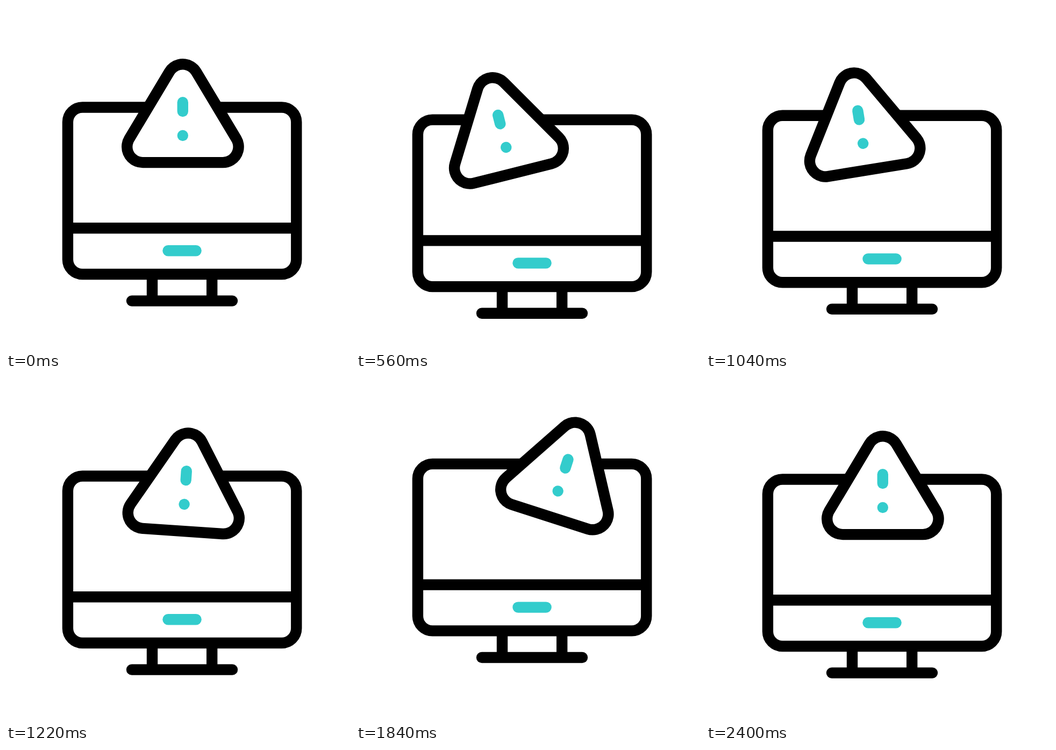
Write an HTML page that moves like this. It is 640 px wide and 640 px high and loops after 2.42 s.

```html
<!DOCTYPE html>
<html lang="en">
<head>
<meta charset="utf-8">
<title>Monitor alert</title>
<style>
  html, body { margin: 0; width: 100%; height: 100%; overflow: hidden; background: #fff; }
  svg { display: block; width: 100%; height: 100%; }
  .ink { fill: none; stroke: #000; stroke-width: 20.4; }
  .accent { fill: none; stroke: #3cc; stroke-width: 20.4; stroke-linecap: round; }
  .outer, .inner { stroke-linejoin: round; }
  .outer { fill: #000; stroke: #000; stroke-width: 78.6; }
  .inner { fill: #fff; stroke: #fff; stroke-width: 37.8; }
</style>
</head>
<body>
<svg viewBox="0 0 640 640">
  <g id="monitor">
    <g class="ink">
      <path d="M272 499V548.6M383.2 499V548.6"/>
      <path d="M234 548.6H421" stroke-linecap="round"/>
      <rect x="114.9" y="188.5" width="425.4" height="310.5" rx="27.3"/>
      <path d="M114.9 413.2H540.3"/>
    </g>
    <path class="accent" d="M301.5 455.2H353.6"/>
  </g>
  <g id="sign">
    <path class="outer" d="M328.9 137.4L403.5 262H254.3Z"/>
    <path class="inner" d="M328.9 137.4L403.5 262H254.3Z"/>
    <path class="accent" d="M328.8 179.2V196.1"/>
    <circle cx="328.8" cy="241" r="10.2" fill="#3cc"/>
  </g>
</svg>
<script>
  const LOOP = 2420, STEP = 800;
  const PIVOT = [328.9, 199.8];
  // sign x shift, shared y shift, sign angle
  const POSES = [[0, 0, 0], [-76, 29.5, -18], [75.8, -36.5, 22.7], [0, 0, 0]];
  const monitor = document.getElementById('monitor');
  const sign = document.getElementById('sign');
  const ease = u => u * u * (3 - 2 * u);

  function draw(ms) {
    const t = Math.min(ms % LOOP, STEP * 3);
    const i = Math.min(Math.floor(t / STEP), 2);
    const k = ease(t / STEP - i);
    const [x, y, angle] = POSES[i].map((v, j) => v + (POSES[i + 1][j] - v) * k);
    monitor.setAttribute('transform', `translate(0 ${y})`);
    sign.setAttribute('transform', `translate(${x} ${y}) rotate(${angle} ${PIVOT})`);
  }

  let start;
  function tick(now) {
    start ??= now;
    draw(now - start);
    requestAnimationFrame(tick);
  }
  draw(0);
  requestAnimationFrame(tick);
</script>
</body>
</html>
```
